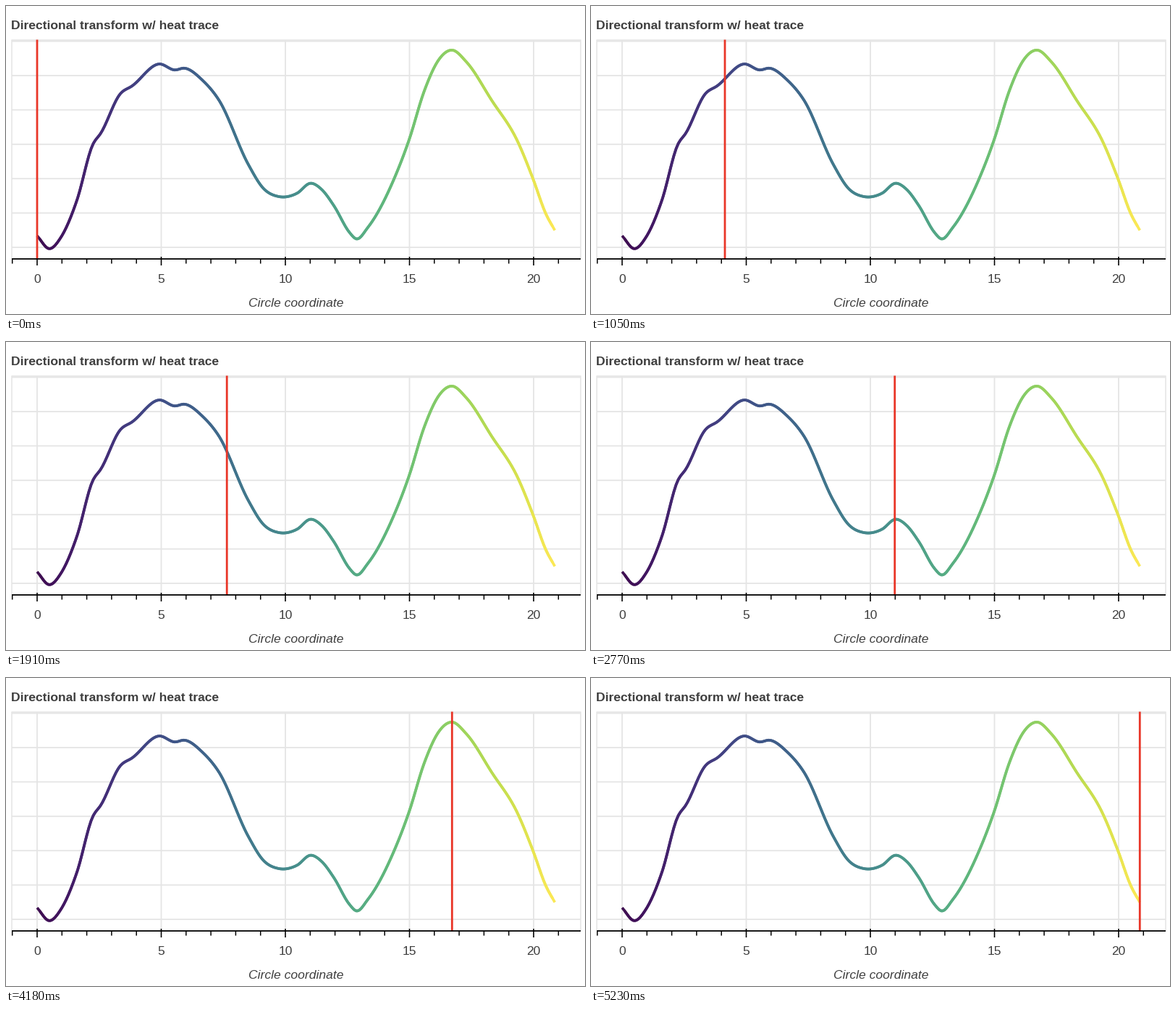
Animation of 800x425 px, one loop 5280 ms. Source, as a matplotlib script:

```python
import numpy as np
import matplotlib.pyplot as plt
from matplotlib.animation import FuncAnimation
from matplotlib.collections import LineCollection

W, H, DPI = 800, 425, 100
PX = 72 / DPI
LOOP, TICK = 5280, 10
LEFT, RIGHT, TOP, BOTTOM = 8, 794, 47, 349
X0, UNIT = 43, 34.3
STEPS = 115
GREY, INK = "#e5e5e5", "#3f3f3f"

# Turning points and bends of the trace
KEYS = np.array([
    (43, 317), (60, 335), (76, 319), (98, 268), (120, 191), (131, 175.5),
    (158, 121), (174, 110.5), (212, 80), (233, 88.3), (247, 85.8), (271, 102),
    (294, 129.5), (335, 219), (355, 251), (377, 263), (402, 258.5),
    (421, 244.5), (436, 253), (453, 275.5), (475, 313), (484, 321.5),
    (500, 305.5), (536, 239), (557, 184.5), (578, 117), (598, 74),
    (616, 60.8), (636, 77), (671, 130), (707, 187), (728, 238), (746, 287),
    (758.3, 309.5),
])

# Step and position of the cursor where its pace changes
PACE = np.array([(0, 43), (23, 185), (42, 305.2), (48, 344), (61, 419.7),
                 (74, 501.4), (92, 616.3), (STEPS, 758.3)])


def wide_gamut(rgb):
    """Convert sRGB values to Display P3 values."""
    m = np.array([[0.8225, 0.1775, 0], [0.0332, 0.9668, 0],
                  [0.0171, 0.0724, 0.9105]])
    return (np.asarray(rgb) ** 2.2 @ m.T).clip(0, 1) ** (1 / 2.2)


def smooth(keys, n):
    """Cubic Hermite curve through the keys."""
    kx, ky = keys.T
    slope = np.gradient(ky, kx)
    x = np.linspace(kx[0], kx[-1], n)
    i = np.clip(np.searchsorted(kx, x, side="right") - 1, 0, len(kx) - 2)
    h = kx[i + 1] - kx[i]
    t = (x - kx[i]) / h
    y = ((1 + 2 * t) * (1 - t) ** 2 * ky[i] + t * (1 - t) ** 2 * h * slope[i]
         + t * t * (3 - 2 * t) * ky[i + 1] + t * t * (t - 1) * h * slope[i + 1])
    return np.column_stack([x, y])


fig = plt.figure(figsize=(W / DPI, H / DPI), dpi=DPI, facecolor="white")
ax = fig.add_axes([0, 0, 1, 1])
ax.set(xlim=(0, W), ylim=(H, 0))
ax.axis("off")


def strokes(segs, color, width, z, **kw):
    lines = LineCollection(segs, colors=color, linewidths=width * PX,
                           zorder=z, **kw)
    lines.set_snap(False)
    ax.add_collection(lines, autolim=False)


def label(x, y, text, px, **kw):
    ax.text(x, y, text, fontsize=px * PX, family="Liberation Sans",
            color=INK, va="baseline", **kw)


# Grid and frame
major = range(0, 21, 5)
rows = 48.6 + 47.4 * np.arange(7)
strokes([[(X0 + UNIT * u, TOP), (X0 + UNIT * u, BOTTOM)] for u in major]
        + [[(LEFT, y), (RIGHT, y)] for y in rows], GREY, 1.8, 1)
strokes([[(LEFT, BOTTOM), (LEFT, TOP), (RIGHT, TOP), (RIGHT, BOTTOM)]],
        GREY, 1.6, 1)

# Trace; overlapping pieces hide the seams between colours
pts = smooth(KEYS, 2 * STEPS + 1)
pieces = np.stack([pts[:-2], pts[1:-1], pts[2:]], axis=1)
shades = plt.get_cmap("viridis")(np.linspace(0, 1, len(pieces)))[:, :3]
strokes(pieces, wide_gamut(shades), 3.7, 2, capstyle="butt")

cursor, = ax.plot([X0, X0], [TOP - 0.5, BOTTOM + 0.5],
                  color=wide_gamut([1, 0, 0]), lw=2.8 * PX, zorder=3,
                  solid_capstyle="butt", snap=False)

# Axis
strokes([[(LEFT, BOTTOM), (RIGHT, BOTTOM)]], "black", 1.8, 4)
for u in range(-1, 22):
    x = X0 + UNIT * u
    if u in major:
        strokes([[(x, BOTTOM - 3), (x, BOTTOM + 9)]], "black", 1.6, 2.5)
        label(x, 382, str(u), 17.4, ha="center")
    else:
        strokes([[(x, BOTTOM), (x, BOTTOM + 6.5)]], "black", 1.5, 2.5)

label(7, 31.8, "Directional transform w/ heat trace", 17.5, weight="bold")
label(401, 415, "Circle coordinate", 17.5, ha="center", style="italic")


def update(n):
    # 22 steps per second, each landing on the nearest tick
    step = min((2 * n + 1) * 11 // 100, STEPS)
    x = np.interp(step, *PACE.T)
    cursor.set_xdata([x, x])
    return cursor,


anim = FuncAnimation(fig, update, frames=LOOP // TICK, interval=TICK,
                     repeat=True, repeat_delay=0)
plt.show()
```
